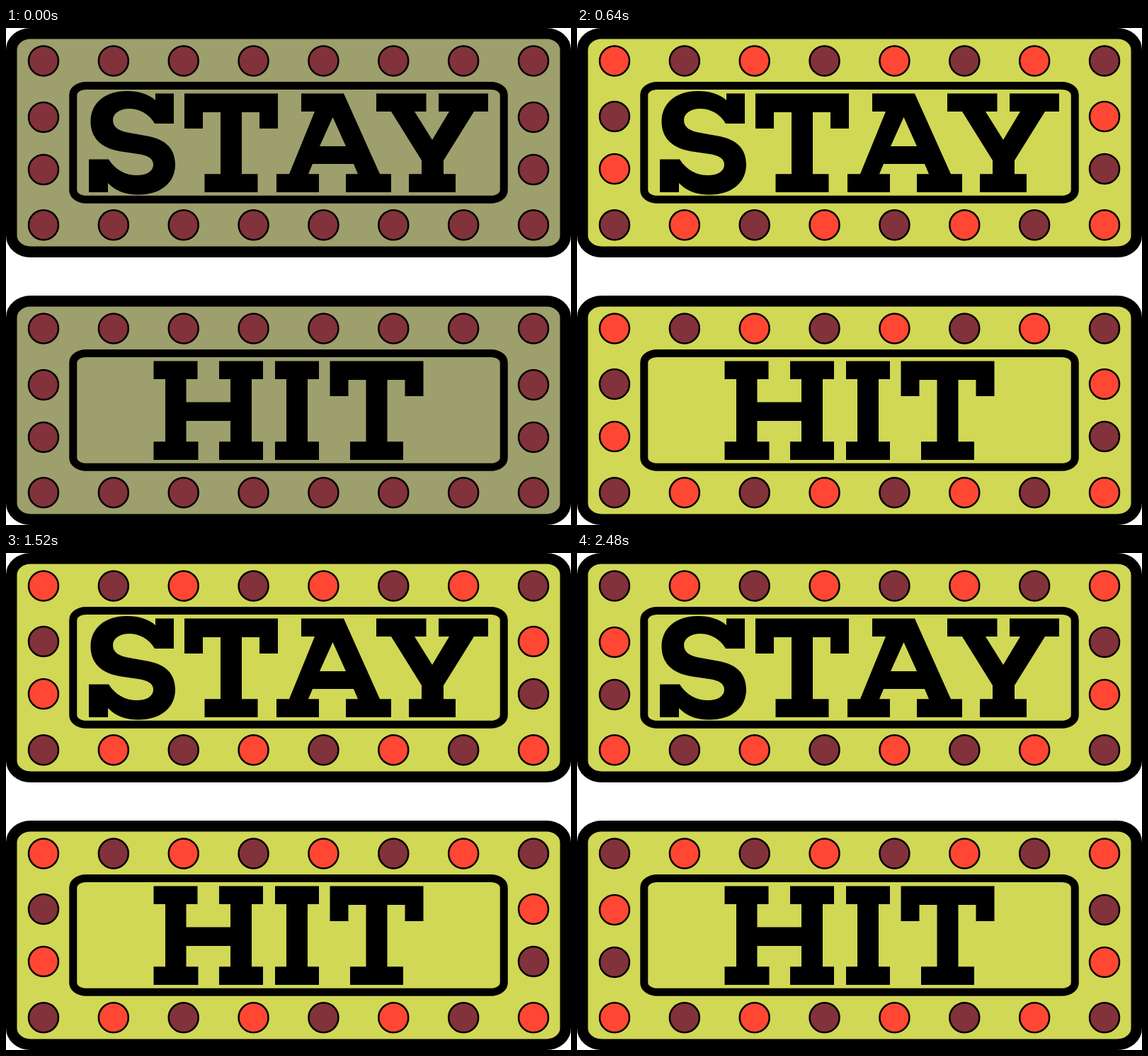
Animation, 798 px wide and 702 px high, one loop 2.56 s. Source, as an HTML page:

```html
<!DOCTYPE html>
<html lang="en">
<head>
<meta charset="utf-8">
<title>Stay / Hit signs</title>
<style>
  html, body { margin: 0; width: 100%; height: 100%; overflow: hidden; background: #fff; }
  svg { display: block; width: 798px; height: 702px; }
  .board, .odd, .even, .side { animation: 2560ms step-end infinite; }
  .board { fill: #9d9f6c; stroke: #000; stroke-width: 15.5; animation-name: glow; }
  .panel { fill: none; stroke: #000; stroke-width: 11; }
  .lamp { fill: #82323a; stroke: #000; stroke-width: 2.5; }
  .odd { animation-name: odd; }
  .even { animation-name: even; }
  .side { animation-name: nudge; }

  /* eight beats of 320 ms: unlit, then odd and even lamps in turn */
  @keyframes glow {
    0% { fill: #9d9f6c; }
    12.5%, 100% { fill: #d0d855; }
  }
  @keyframes odd {
    0%, 25%, 50%, 75% { fill: #82323a; }
    12.5%, 37.5%, 62.5%, 87.5%, 100% { fill: #ff4733; }
  }
  @keyframes even {
    0%, 12.5%, 37.5%, 62.5%, 87.5%, 100% { fill: #82323a; }
    25%, 50%, 75% { fill: #ff4733; }
  }
  @keyframes nudge {
    0%, 12.5%, 37.5%, 62.5%, 87.5%, 100% { transform: translateY(0); }
    25%, 50%, 75% { transform: translateY(-1px); }
  }
</style>
</head>
<body>
<svg viewBox="0 0 798 702">
  <defs>
    <path id="T" d="M252 92.5H384V142H358V119H333V206.3H355.5V232H280.5V206.3H303V119H278V142H252Z"/>
  </defs>
  <g class="sign" role="img" aria-label="STAY">
    <path d="M211 92.5H237V135H210C202 121 188 114 174 114C160 114 151 121 151 130C151 141 160 145.500 174 148L199 152.500C226 157 239 171 239 193C239 219 218 235.500 187 235.500C169 235.500 154 230 144 219V232H117V185.500H145C155 201 169 208 185 208C199 208 208 202 208 193C208 184 200 180 187 178L163 174.500C134 170 119.500 155 119.500 132C119.500 106 140 89 171 89C187 89 201 93 211 102Z"/>
    <use href="#T"/>
    <path fill-rule="evenodd" d="M417 92.500H477L528 206.300H544V232H480V206.300H497L491 192H433L427 206.300H442V232H382V206.300H400L436 118H417ZM461.500 126L443 167H480Z"/>
    <path d="M523 92.500H593.500V118H577L602 158L626 118H611V92.500H681V118H661L618 187V206.300H635V232H569V206.300H587V187L544 118H523Z"/>
  </g>
  <g class="sign" role="img" aria-label="HIT" transform="translate(0 378)">
    <path d="M208.500 92.500H270.500V118H254.500V150.500H317V118H301V92.500H363V118H347V206.300H363V232H301V206.300H317V177H254.500V206.300H271.500V232H208.500V206.300H225V118H208.500Z"/>
    <path d="M380 92.500H442V118H426V206.300H442V232H380V206.300H396V118H380Z"/>
    <use href="#T" x="205.500"/>
  </g>
</svg>
<script>
  const rows = [46.5, 126, 200, 278.3];

  function lamp(row, col) {
    const parity = (row + col) % 2 ? 'odd' : 'even';
    const x = 53 + col * 98.86;
    const circle = `<circle class="lamp ${parity}" cx="${x}" cy="${rows[row]}" r="21"/>`;
    return row % 3 ? `<g class="side">${circle}</g>` : circle;
  }

  let back = `
    <rect class="board" x="7.75" y="7.75" width="782.5" height="308.5" rx="27" ry="23"/>
    <rect class="panel" x="94.75" y="81.5" width="608.5" height="160.8" rx="18.5" ry="13"/>`;
  rows.forEach((_, row) => {
    for (let col = 0; col < 8; col += row % 3 ? 7 : 1) back += lamp(row, col);
  });
  for (const sign of document.querySelectorAll('.sign')) {
    sign.insertAdjacentHTML('afterbegin', back);
  }
</script>
</body>
</html>
```
